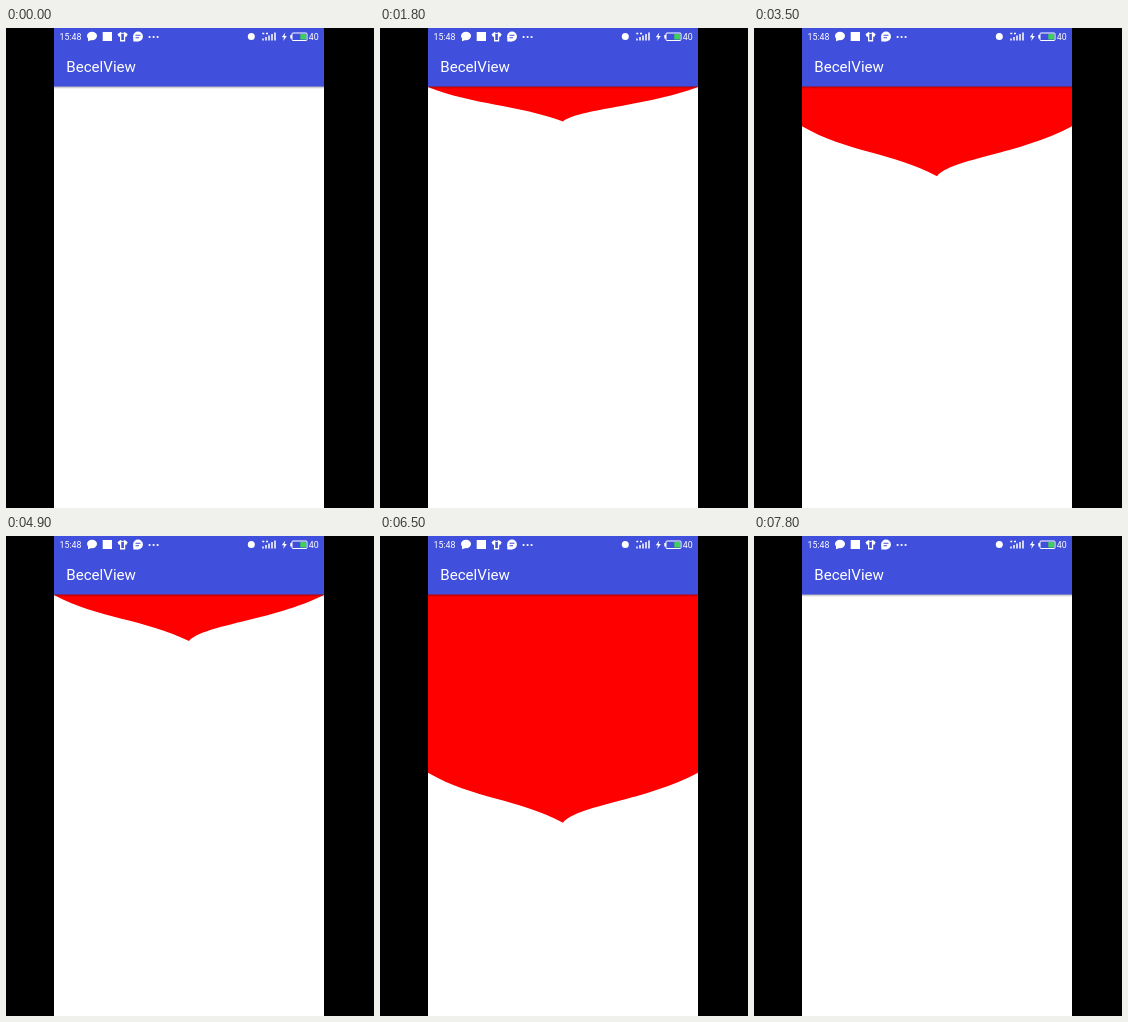
These frames come from a looping animation (368x480 px, 8.9 s). An HTML page:

```html
<!DOCTYPE html>
<html lang="en">
<head>
<meta charset="utf-8">
<title>BecelView</title>
<style>
  html, body { margin: 0; width: 100%; height: 100%; overflow: hidden; background: #000; }
  svg { display: block; width: 368px; height: 480px; --bar: #404fdc; }
  text { font-family: Roboto, sans-serif; fill: #fff; }
  .small { font-size: 8.8px; }
  .title { font-size: 15.1px; }
  .white { fill: #fff; }
  .line { fill: none; stroke: #fff; }
  .dots { fill: none; stroke: #fff; stroke-width: 2.2; stroke-linecap: round; stroke-dasharray: 0 4; }
</style>
</head>
<body>
<svg viewBox="0 0 368 480">
  <defs>
    <linearGradient id="shade" x2="0" y2="1">
      <stop offset="0" stop-opacity=".35"/>
      <stop offset="1" stop-opacity="0"/>
    </linearGradient>
  </defs>
  <rect width="368" height="480"/>
  <rect class="white" x="48" width="270" height="480"/>
  <path id="drape" fill="#f00"/>
  <rect x="48" y="58" width="270" height="3" fill="url(#shade)"/>
  <rect x="48" width="270" height="58.5" fill="var(--bar)"/>
  <text class="title" x="60.3" y="43.5">BecelView</text>

  <!-- status bar, left -->
  <text class="small" x="53.5" y="12">15:48</text>
  <g class="white">
    <ellipse cx="86" cy="8" rx="5" ry="4.2"/>
    <path d="M82 10v3.2l4-1.4z"/>
    <rect x="96.7" y="4" width="9.3" height="9"/>
    <path d="M114.5 4q2.1 1.8 4.200 0l3 2.300-1.500 2.700-1-.4v4.900h-5.200V8.600l-1 .4-1.500-2.700z"/>
    <circle cx="132" cy="8.5" r="4.9"/>
    <path d="M127.3 9v4.4h4.7z"/>
  </g>
  <path d="M115.300 5.500q1.300.8 2.600 0V12h-2.600zM129.500 6.800h5v1h-5zm0 2.400h3.500v1h-3.500z" fill="var(--bar)"/>
  <path class="dots" d="M143.600 9h8.500"/>

  <!-- status bar, right -->
  <circle class="white" cx="245.3" cy="8.5" r="3.5"/>
  <path id="signal" class="line" stroke-width="1.5"/>
  <path class="line" d="M256.300 5.500h2m1.700 0h2" stroke-width="1.500"/>
  <path class="white" d="M279.300 4.500l-3.500 4.800H278l-.8 3.700 3.600-5h-2.300z"/>
  <rect class="line" x="286" y="5" width="15" height="7.5" rx="1"/>
  <rect class="white" x="284.3" y="7" width="1.7" height="3.5"/>
  <rect x="294.3" y="6" width="6" height="5.5" fill="#3fd05a"/>
  <text class="small" x="302.7" y="12">40</text>
</svg>
<script>
const LOOP = 8900, STEP = 100, TOP = 59, SAG = 50;
const drape = document.getElementById('drape');

// Each pull eases out to its peak, rests, then moves on to its last value.
const pulls = [
  { start: 400, top: 1000, leave: 1300, end: 2500, peak: 53, last: 0, bend: .8 },
  { start: 2800, top: 4000, leave: 4000, end: 5800, peak: 108, last: 0, bend: 1.23 },
  { start: 5900, top: 6780, leave: 6800, end: 7500, peak: 253.5, last: 472, bend: 1 }
];

const part = (t, from, to) => Math.min(1, Math.max(0, (t - from) / (to - from)));

function pullAt(t) {
  const p = pulls.find(p => t >= p.start && t < p.end);
  if (!p) return 0;
  const rise = 1 - (1 - part(t, p.start, p.top)) ** 2;
  const fall = (1 - part(t, p.leave, p.end)) ** p.bend;
  return t < p.leave ? p.peak * rise : p.last + (p.peak - p.last) * fall;
}

function drapePath(pull) {
  if (pull <= 0) return '';
  const sag = Math.min(pull, SAG), side = TOP + pull - sag;
  const at = (x, k) => `${48 + x},${side + sag * k}`;
  return `M48,58H318V${side}` +
    `C${at(218, .56)} ${at(150, .64)} ${at(135, 1)}` +
    `C${at(90, .52)} ${at(45, .52)} ${at(0, 0)}Z`;
}

let bars = '';
for (let i = 0; i < 5; i++) bars += `M${257 + 3 * i},12.5v${-2 - 1.5 * i}`;
document.getElementById('signal').setAttribute('d', bars);

const start = performance.now();
function draw() {
  const t = (performance.now() - start) % LOOP;
  drape.setAttribute('d', drapePath(pullAt(Math.floor(t / STEP) * STEP)));
  requestAnimationFrame(draw);
}
draw();
</script>
</body>
</html>
```
